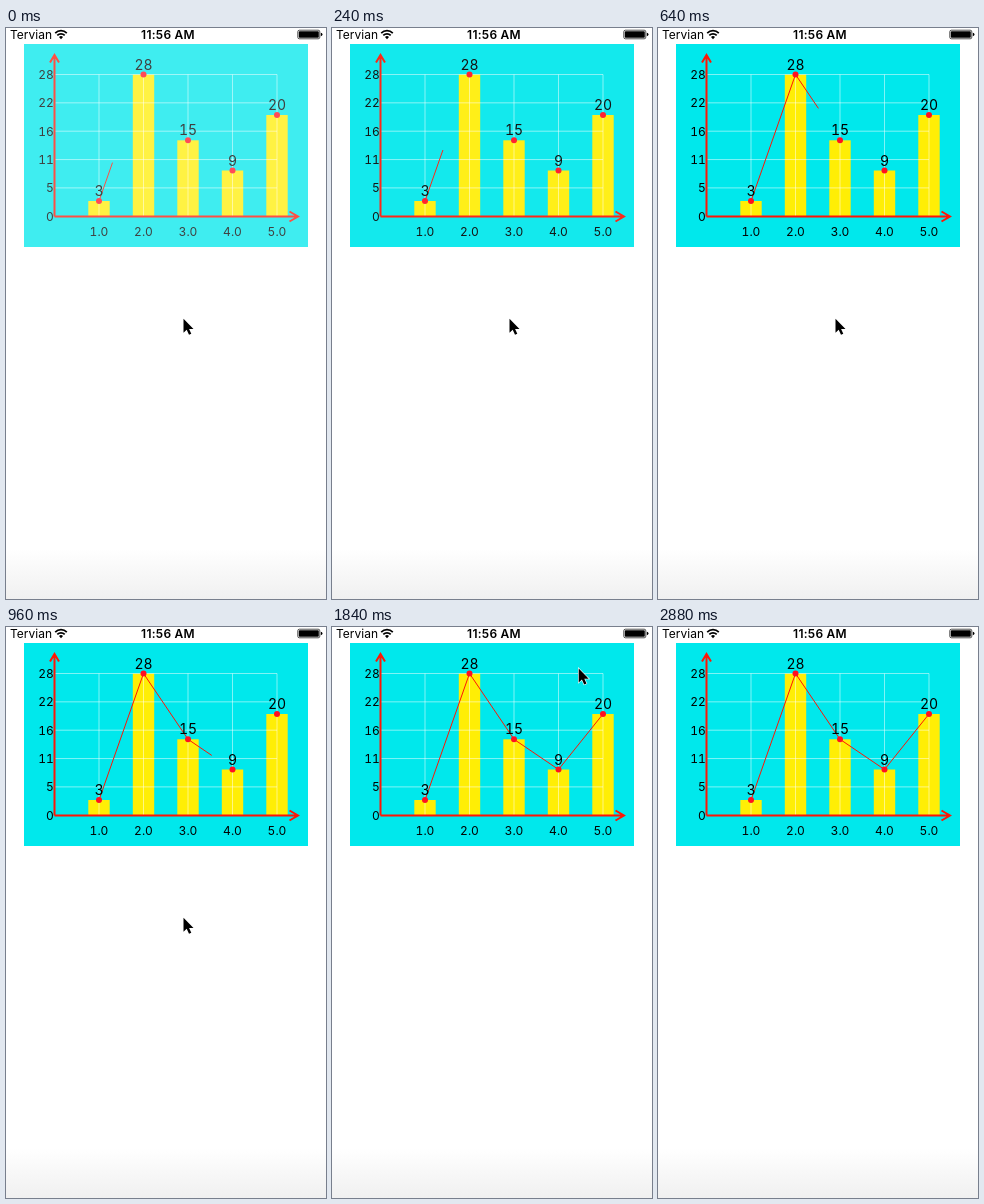
Write an HTML page that moves like this. It is 320 px wide and 571 px high and loops after 2.96 s.

```html
<!DOCTYPE html>
<html lang="en">
<head>
<meta charset="utf-8">
<title>Chart</title>
<style>
  html, body { margin: 0; width: 100%; height: 100%; overflow: hidden; background: #fff; }
  svg { display: block; width: 100vw; height: 100vh; }
  text { font-family: Inter, Roboto, "Liberation Sans", sans-serif; font-size: 12px; }
  .mid { text-anchor: middle; }
  .end { text-anchor: end; }
  #chart text { font-variant-numeric: tabular-nums; }
  #chart .value { font-size: 14px; }
  .clock { font-weight: 600; letter-spacing: .25px; }
  .stroke { fill: none; stroke: #ff1505; }
</style>
</head>
<body>
<svg viewBox="0 0 320 571">
  <defs>
    <linearGradient id="shade" x1="0" y1="0" x2="0" y2="1">
      <stop offset="0" stop-color="#fff"/>
      <stop offset="1" stop-color="#f0f0f0"/>
    </linearGradient>
  </defs>
  <rect y="521" width="320" height="50" fill="url(#shade)"/>

  <g id="status">
    <text x="4" y="10.7">Tervian</text>
    <g fill="none" stroke="#000" stroke-width="1.7">
      <path d="M49.2 5.1a8.2 8.2 0 0 1 11.6 0M51.3 7.4a5.2 5.2 0 0 1 7.4 0"/>
      <path d="M55 11.2l-2-2.1a2.8 2.8 0 0 1 4 0z" fill="#000" stroke="none"/>
    </g>
    <text class="mid clock" x="162" y="10.7">11:56 AM</text>
    <rect x="291.8" y="2.2" width="22" height="8.6" rx="1.6" fill="none" stroke="#000" stroke-width=".7"/>
    <rect x="292.8" y="3.2" width="20" height="6.6" rx=".8"/>
    <path d="M314.8 4.8q1.7 .3 1.7 1.7t-1.7 1.7z"/>
  </g>

  <g id="chart">
    <rect x="18" y="16" width="284" height="203" fill="#00e8ec"/>
    <g id="bars" fill="#ffee05"></g>
    <path id="grid" fill="none" stroke="#fff" stroke-opacity=".5"/>
    <path class="stroke" stroke-width="2" d="M48.5 188.5V27.5M44 34.5L48.5 27L53 34.5M48.5 188.5H291.5M283.5 183.5L292 188.5L283.5 193.5"/>
    <polyline id="line" class="stroke" stroke-width="1"/>
    <g id="dots" fill="#ff1020"></g>
    <g id="labels"></g>
  </g>

  <path id="cursor" d="M0 0V14L3.2 11.1L5.5 16L7.8 15L5.6 10.2H10Z" stroke="#fff" stroke-width="1.2" paint-order="stroke"/>
</svg>
<script>
  const $ = id => document.getElementById(id);
  const add = (parent, tag, attrs, text = "") => {
    const el = document.createElementNS("http://www.w3.org/2000/svg", tag);
    for (const k in attrs) el.setAttribute(k, attrs[k]);
    el.textContent = text;
    $(parent).append(el);
  };

  const base = 188, top0 = 46.5, left = 48.5, gap = 44.5;
  const values = [3, 28, 15, 9, 20];
  const heights = [173, 46.5, 112.3, 142.5, 87];
  const points = heights.map((y, i) => [93 + gap * i, y]);
  const right = points[4][0];
  let grid = "";

  points.forEach(([x, y], i) => {
    add("bars", "rect", { x: x - 10.7, y, width: 21.4, height: base - y });
    add("dots", "circle", { cx: x, cy: y, r: 3 });
    add("labels", "text", { x, y: y - 5, class: "mid value" }, values[i]);
    add("labels", "text", { x, y: 207.5, class: "mid" }, (i + 1).toFixed(1));
    grid += `M${x} ${top0}V${base}`;
  });
  [28, 22, 16, 11, 5, 0].forEach((n, i) => {
    const y = top0 + i * 28.35;
    add("labels", "text", { x: 47.7, y: y + 4.4, class: "end" }, n);
    if (n) grid += `M${left} ${y}H${right}`;
  });
  $("grid").setAttribute("d", grid);
  $("line").setAttribute("points", points.join(" "));
  const total = points.slice(1).reduce((sum, [x, y], i) =>
    sum + Math.hypot(x - points[i][0], y - points[i][1]), 0);

  // Rows of [time, value]
  const drawn = [[0, 40.7], [80, 47.7], [240, 54], [640, 175], [1280, 309.5], [1440, 330], [1600, total]];
  const fade = [[0, .75], [80, .85], [240, .92], [400, .97], [560, 1]];
  const cursorX = [[1600, 177.5], [1680, 181], [1760, 207], [1840, 246.7], [1920, 262]];
  const cursorY = [[1600, 290.7], [1680, 282], [1760, 170], [1840, 41.5], [1920, -30]];

  const at = (rows, t) => {
    const i = rows.findIndex(row => row[0] > t);
    if (i < 0) return rows[rows.length - 1][1];
    if (i === 0) return rows[0][1];
    const [t0, a] = rows[i - 1], [t1, b] = rows[i];
    return a + (b - a) * (t - t0) / (t1 - t0);
  };

  const loop = 2960, step = 80, start = performance.now();
  function draw() {
    const t = Math.floor((performance.now() - start) % loop / step) * step;
    $("chart").setAttribute("opacity", at(fade, t));
    $("line").setAttribute("stroke-dasharray", `${at(drawn, t)} ${total + 10}`);
    $("cursor").setAttribute("transform", `translate(${at(cursorX, t)} ${at(cursorY, t)})`);
    requestAnimationFrame(draw);
  }
  draw();
</script>
</body>
</html>
```
